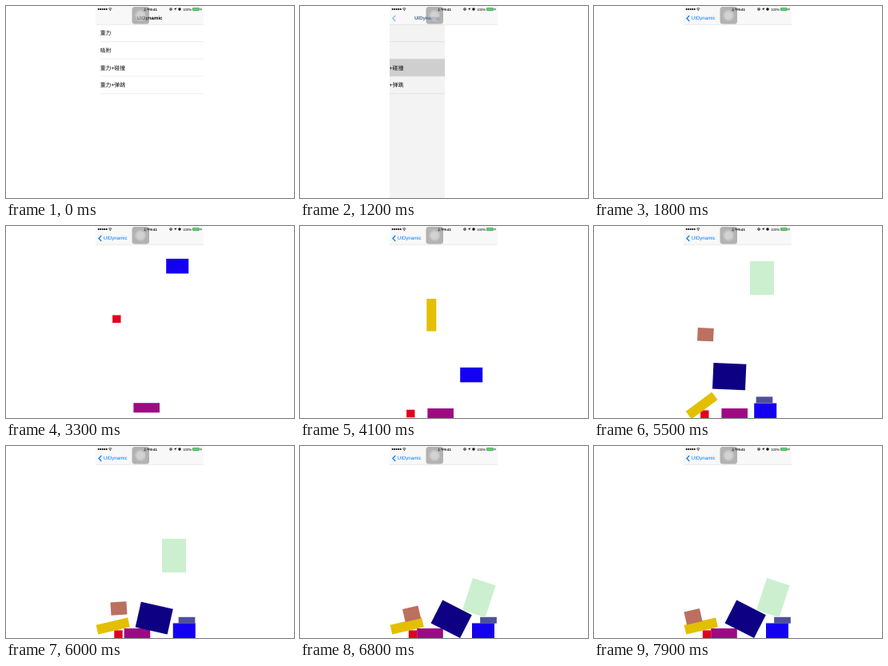
Write an HTML page that moves like this. It is 360 by 240 pixels and loops after 8 s.

```html
<!DOCTYPE html>
<html lang="zh-CN">
<head>
<meta charset="utf-8">
<title>UIDynamic</title>
<style>
  html, body { margin: 0; width: 100%; height: 100%; overflow: hidden; background: #fff; }
  svg { display: block; width: 100vw; height: 100vh; }
  text { font: 6.12px "Liberation Sans", "Noto Sans CJK SC", "Noto Sans CJK", sans-serif; text-rendering: geometricPrecision; }
  .rows text { font-size: 6.8px; font-weight: 500; }
  .status text { font-size: 4.3px; }
  .status .bold, .bold { font-weight: 700; }
</style>
</head>
<body>
<svg viewBox="0 0 360 240">
  <clipPath id="screen"><rect x="112" width="135" height="240"/></clipPath>
  <g clip-path="url(#screen)">
    <g id="menu" class="rows">
      <rect id="tapped" x="112" y="66.2" width="135" height="21.6" fill="#d9d9d9"/>
    </g>
    <rect id="dim" x="112" y="23" width="135" height="217"/>
    <g id="page"><rect x="112" y="23" width="135" height="217" fill="#fff"/></g>

    <rect x="112" width="135" height="23" fill="#f8f8f8"/>
    <path d="M112 23.3H247" stroke="#d0d0d0" stroke-width=".5"/>
    <text id="title" class="bold" x="179.7" y="17.4" text-anchor="middle">UIDynamic</text>
    <g id="back" fill="#007aff">
      <path d="M119.3 12L115.9 15.5L119.3 19" fill="none" stroke="#007aff" stroke-width="1.2"/>
      <text id="backLabel" x="121.8" y="17.4">UIDynamic</text>
    </g>

    <g class="status">
      <path d="M115.7 4H126" stroke="#000" stroke-width="2.1" stroke-linecap="round" stroke-dasharray="0 2.5"/>
      <path d="M128.2 3.4Q130.3 1.7 132.4 3.4M129.2 4.6Q130.3 3.7 131.4 4.6" fill="none" stroke="#000" stroke-width=".7"/>
      <circle cx="130.3" cy="5.4" r=".5"/>
      <text x="180.2" y="5.6" text-anchor="middle" class="bold">上午9:41</text>
      <circle cx="206" cy="4" r="1.5" fill="none" stroke="#000" stroke-width=".6"/>
      <rect x="205.3" y="3.5" width="1.4" height="1.2"/>
      <path d="M213.2 2.3L211.8 5.7L211.5 4.1L209.8 3.8Z"/>
      <circle cx="217" cy="4" r="1.7"/>
      <text x="221.2" y="5.6">100%</text>
      <rect x="233.3" y="2.4" width="8.2" height="3.3" rx=".7" fill="#4cd964" stroke="#333" stroke-width=".4"/>
      <path d="M242.1 3.4V4.7" stroke="#333" stroke-width=".6"/>
      <path d="M244.3 2.2L243 4.3H243.8L243.4 6L244.8 3.7H244Z"/>
    </g>

    <rect x="157.5" y="1" width="21.5" height="21.5" rx="3.5" fill="#666" fill-opacity=".48"/>
    <g fill="#fff" fill-opacity=".17">
      <circle cx="168.2" cy="11.8" r="7.2"/>
      <circle cx="168.2" cy="11.8" r="5.9"/>
      <circle cx="168.2" cy="11.8" r="4.6"/>
    </g>
  </g>
</svg>
<script>
const $ = id => document.getElementById(id);
const LOOP = 8, GRAVITY = 360, BOUNCE = .2, DROP_TOP = 40;
const clamp = v => Math.min(1, Math.max(0, v));
const easeOut = p => 1 - (1 - p) ** 3;

function add(parent, tag, attrs, text = '') {
  const el = document.createElementNS('http://www.w3.org/2000/svg', tag);
  for (const k in attrs) el.setAttribute(k, attrs[k]);
  el.textContent = text;
  return parent.appendChild(el);
}

['重力', '吸附', '重力+碰撞', '重力+弹跳'].forEach((label, i) => {
  const bottom = 44.6 + 21.6 * i;
  add($('menu'), 'text', { x: 117.8, y: bottom - 8.2 }, label);
  add($('menu'), 'path', { d: `M117.6 ${bottom}H247`, stroke: '#ddd', 'stroke-width': .5 });
});

// A body drops at centre x onto its ground, then gets shoved to new resting poses
const bodies = [];
function body(fill, w, h, x, born, ground, ...shoves) {
  const el = add($('page'), 'rect', { x: -w / 2, y: -h / 2, width: w, height: h, fill });
  const start = DROP_TOP + h / 2, base = ground - h / 2;
  const fall = Math.sqrt(2 * (base - start) / GRAVITY);
  bodies.push({ el, x, born, start, base, fall, shoves });
}
const shove = (from, to, dx, dy = 0, turn = 0) => ({ from, to, dx, dy, turn });

body('#9e0a82', 32.6, 12, 175.7, 2.01, 240, shove(5.57, 6.4, -13.2));
body('#e2001f', 10.4, 9.6, 138.3, 2.67, 240, shove(5.7, 6.4, 2.7));
body('#1400f0', 28, 18.5, 214.2, 3.228, 240, shove(5.8, 6.6, 14.8));
body('#e3bf00', 12, 40.6, 164.3, 3.568, 228, shove(4.48, 5.95, -30.6, 17.3, 77));
body('#4f509a', 20.7, 8, 213, 4.13, 221.8, shove(5.8, 6.6, 22.5));
body('#0e0082', 41, 32.4, 169.2, 4.644, 227.5, shove(4.8, 5.5, 0, 0, 2.5), shove(5.57, 6.6, 20, 5, 24.5));
body('#bb7060', 20, 16.4, 139.4, 4.803, 211, shove(4.85, 5.5, 0, 0, 2.5),
  shove(5.74, 6.4, 2, 6.6, -15.5), shove(6.77, 7.6, -17.4, 3.8));
body('#ccf0cf', 30, 42, 210, 5.35, 201, shove(6.17, 6.7, 13.8, 9.7, 18));

// Height above the ground: free fall, then ever smaller hops
function lift({ start, base, fall }, age) {
  if (age < fall) return base - start - GRAVITY / 2 * age ** 2;
  age -= fall;
  let hop = 2 * BOUNCE * fall;
  while (age > hop && hop > .01) {
    age -= hop;
    hop *= BOUNCE;
  }
  return Math.max(0, GRAVITY / 2 * age * (hop - age));
}

function place(b, t) {
  let { x } = b, y = b.base - lift(b, t - b.born), angle = 0;
  for (const s of b.shoves) {
    const p = clamp((t - s.from) / (s.to - s.from));
    x += s.dx * easeOut(p);
    y += s.dy * easeOut(p);
    angle += s.turn * p;
  }
  b.el.setAttribute('visibility', t >= b.born ? 'visible' : 'hidden');
  b.el.setAttribute('transform', `translate(${x} ${y}) rotate(${angle})`);
}

function render(t) {
  const push = easeOut(clamp((t - 1.1) / .5));
  const shift = (id, x) => $(id).setAttribute('transform', `translate(${x} 0)`);
  const fade = (id, o) => $(id).setAttribute('opacity', o);
  shift('menu', -40 * push);
  shift('page', 135 * (1 - push));
  shift('title', -43 * push);
  shift('backLabel', 42 * (1 - push));
  fade('dim', .1 * push);
  fade('title', 1 - push);
  fade('back', push);
  fade('tapped', t >= 1 ? 1 : 0);
  for (const b of bodies) place(b, t);
}

function tick() {
  render(Math.floor(performance.now() / 100) % (LOOP * 10) / 10);
  requestAnimationFrame(tick);
}
tick();
</script>
</body>
</html>
```
